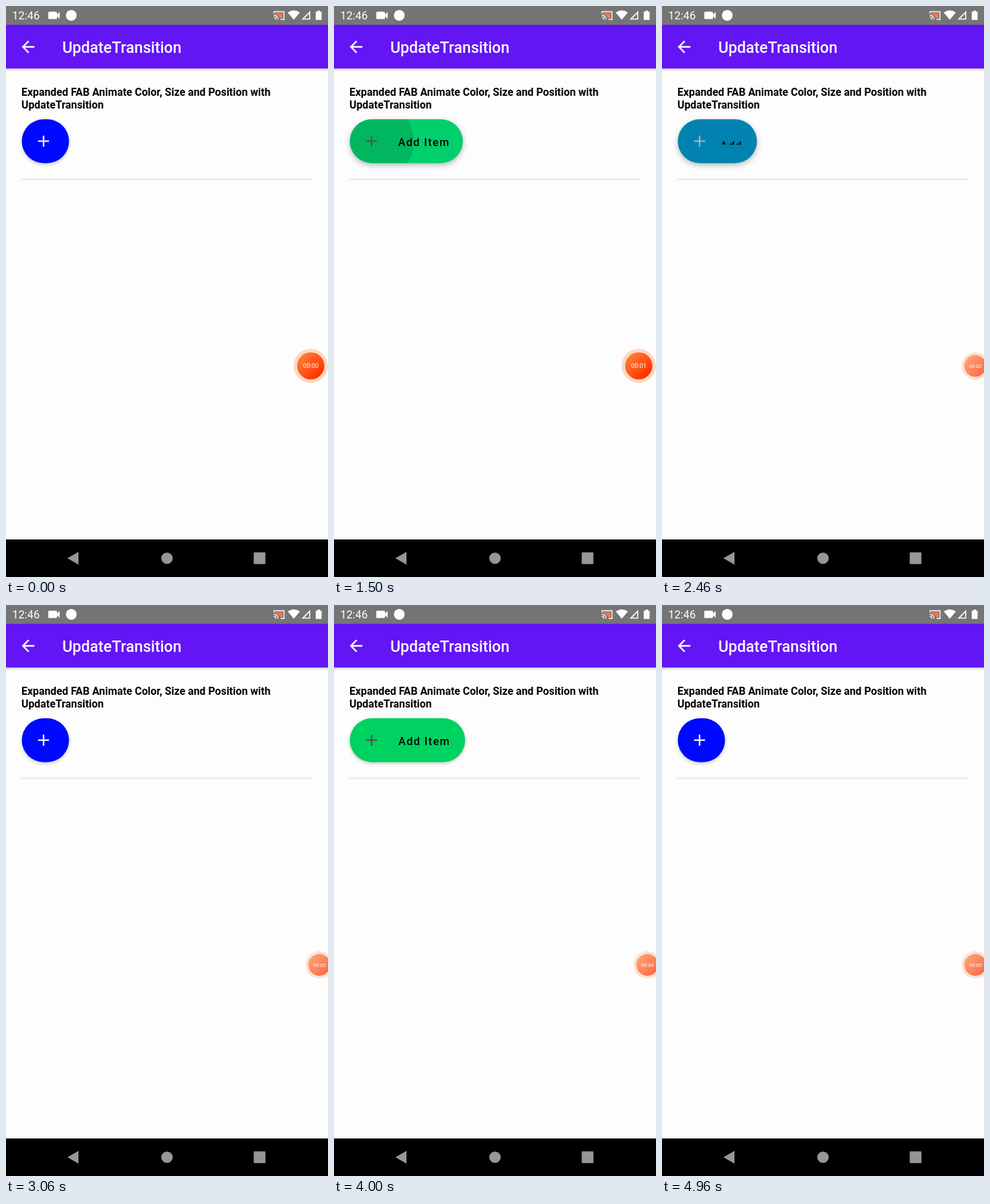
Animation of 480x852 px, one loop 5 s. Source, as an HTML page:

```html
<!DOCTYPE html>
<html lang="en">
<head>
<meta charset="utf-8">
<title>Expanding button</title>
<style>
html, body { margin: 0; width: 100%; height: 100%; overflow: hidden; background: #fdfdfd; }
svg { display: block; width: 480px; height: 852px; font-family: Roboto, sans-serif; }
</style>
</head>
<body>
<svg viewBox="0 0 480 852">
  <defs>
    <linearGradient id="edge" x2="0" y2="1">
      <stop stop-opacity=".16"/><stop offset="1" stop-opacity="0"/>
    </linearGradient>
    <linearGradient id="hot" x2="1" y2="1">
      <stop offset=".1" stop-color="#ff8038"/><stop offset=".8" stop-color="#ff3502"/>
    </linearGradient>
    <clipPath id="fabClip"><rect class="fab" x="23.5" y="169" height="65.5" rx="33"/></clipPath>
    <clipPath id="labelClip"><rect id="labelBox" x="70"/></clipPath>
  </defs>

  <rect width="480" height="852" fill="#fdfdfd"/>
  <rect y="93" width="480" height="5" fill="url(#edge)"/>
  <rect y="28" width="480" height="65.3" fill="#6315f4"/>

  <!-- status bar -->
  <rect width="480" height="28" fill="#757575"/>
  <g fill="#fff">
    <text x="9.3" y="20.3" font-size="16.5">12:46</text>
    <path d="M64.500 8.500h10q1.500 0 1.500 1.500v2.500l4-3.500v10l-4-3.500v2.500q0 1.500-1.500 1.500h-10q-1.500 0-1.500-1.500v-8q0-1.500 1.500-1.500z"/>
    <circle cx="97.300" cy="14" r="8"/>
    <path d="M429 20.500 420 9.800q9-6.500 18 0z"/>
    <path d="M440.500 20.300 453.500 7.300v13zM444.500 18.700h7.400v-7.400z" fill-rule="evenodd"/>
    <path d="M464.300 6.800h3.600v1.600h2.600v12.400h-8.800v-12.400h2.600z"/>
  </g>
  <path d="M402 10.500h10.500v7.500h-4.500q-1-4.500-6-5.500z" fill="#f0784f"/>
  <path d="M399.500 11.500v-3h15v11.500h-5M399.300 14q6 .3 6.300 6.300M399.300 17q3 .3 3.300 3.300" fill="none" stroke="#fff" stroke-width="1.300"/>

  <!-- app bar -->
  <path transform="translate(18.800 46.800) scale(1.180)" fill="#fff"
    d="M20 11H7.830l5.590-5.590L12 4l-8 8 8 8 1.410-1.410L7.830 13H20z"/>
  <text x="84" y="69.800" font-size="23.100" font-weight="500" fill="#fff">UpdateTransition</text>

  <g font-size="15.850" font-weight="700">
    <text x="23" y="134">Expanded FAB Animate Color, Size and Position with</text>
    <text x="23" y="153">UpdateTransition</text>
  </g>
  <path d="M23.500 258.500H456.500" stroke="#e1e1e1" stroke-width="1.600"/>

  <!-- expanding button -->
  <rect id="body" class="fab" x="23.5" y="169" height="65.5" rx="33"/>
  <g clip-path="url(#fabClip)"><circle id="ripple" cy="201.700"/></g>
  <path id="plus" d="M47.800 201.700h16.400M56 193.500v16.400" stroke-width="2.300"/>
  <g clip-path="url(#labelClip)">
    <text id="label" font-size="16.300" font-weight="500" letter-spacing="1.400">Add Item</text>
  </g>

  <!-- floating timer -->
  <g id="timer">
    <circle r="25.500" fill="#fbd8c1"/>
    <circle r="20.300" fill="url(#hot)"/>
    <text id="clock" y="3.400" font-size="9.400" fill="#fff" text-anchor="middle"></text>
  </g>

  <!-- navigation bar -->
  <rect y="796" width="480" height="56"/>
  <g fill="#969696">
    <path d="M91.500 824 108 814.500v19z"/>
    <circle cx="240" cy="824" r="8.600"/>
    <rect x="369.300" y="815.300" width="17.400" height="17.400" rx="1"/>
  </g>
</svg>
<script>
const LOOP = 5000;
const PRESS_LEAD = 95;
const TAPS = [1366, 2415, 3543, 4510];
const BLUE = [0, 9, 255], GREEN = [0, 210, 98];

const $ = id => document.getElementById(id);
const clamp = x => Math.min(1, Math.max(0, x));
const mix = (a, b, p) => a + (b - a) * p;
const smooth = x => (x = clamp(x), x * x * (3 - 2 * x));
const set = (el, attrs) => Object.entries(attrs).forEach(([k, v]) => el.setAttribute(k, v));

// Critically damped spring, stiffness 1500
function spring(ms) {
  const x = Math.sqrt(1500) * Math.max(0, ms) / 1000;
  return 1 - (1 + x) * Math.exp(-x);
}

// Colours blend in linear light
const blend = (a, b, p) => `rgb(${a.map((v, i) =>
  Math.round(mix(v ** 2.2, b[i] ** 2.2, p) ** (1 / 2.2)))})`;

function drawButton(t) {
  const last = TAPS.filter(tap => t >= tap).length - 1;
  const closing = last % 2 === 1;
  const s = last < 0 ? 0 : spring(t - TAPS[last]);
  const p = closing ? 1 - s : s;
  const width = mix(70.5, 172, p);

  document.querySelectorAll('.fab').forEach(el => set(el, { width }));
  const touch = TAPS.filter(tap => t >= tap - PRESS_LEAD).length - 1;
  const age = touch < 0 ? 1e4 : t - TAPS[touch] + PRESS_LEAD;
  const lift = clamp(age / 90) * (1 - smooth((age - 230) / 150));
  set($('body'), { fill: blend(BLUE, GREEN, p) });
  $('body').style.filter =
    `drop-shadow(0 ${mix(2, 3, lift)}px ${mix(2.5, 4.5, lift)}px rgba(0,0,0,${mix(0.22, 0.28, lift)}))`;

  const wide = touch % 2 === 1;
  const grow = smooth(age / 225);
  set($('ripple'), {
    cx: wide ? 109.5 : 58.7,
    r: wide ? mix(52, 104, grow) : mix(21, 60.3, grow),
    opacity: 0.12 * clamp(age / 75) * (1 - clamp((age - 225) / 150))
  });

  const grey = Math.round(mix(255, 80, p));
  set($('plus'), { stroke: `rgb(${grey},${grey},${grey})` });
  set($('label'), { x: 96 - 17.5 * (1 - p), y: 209 + 10 * (1 - p) });
  set($('labelBox'), {
    y: 202 - 10 * p,
    height: 20 * p,
    width: Math.max(0, width - 46.5 - (closing ? 23.5 : 11))
  });
}

function drawTimer(t) {
  const rest = smooth((t - 1800) / 200);
  set($('timer'), {
    transform: `translate(${mix(454.3, 467, rest)} 537) scale(${mix(1, 0.8, rest)})`,
    opacity: mix(1, 0.7, rest)
  });
  $('clock').textContent = '00:0' + Math.floor((t + 350) / 1000);
}

function frame() {
  const t = performance.now() % LOOP;
  drawButton(t);
  drawTimer(t);
  requestAnimationFrame(frame);
}
frame();
</script>
</body>
</html>
```
